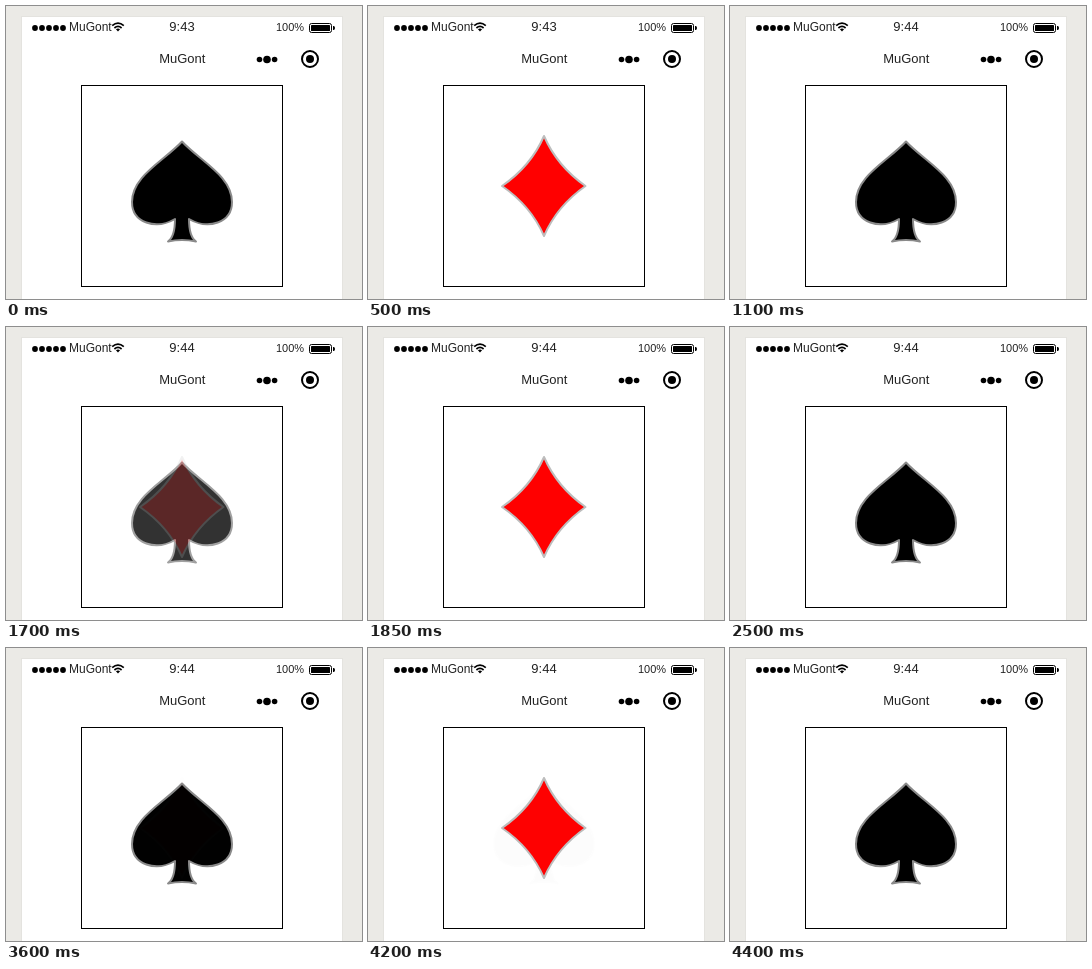
Write an HTML page that moves like this. It is 356 px wide and 293 px high and loops after 4950 ms.

```html
<!DOCTYPE html>
<html lang="en">
<head>
<meta charset="utf-8">
<title>Card suit</title>
<style>
  html, body { margin: 0; width: 100%; height: 100%; overflow: hidden; background: #ebeae6; }
  svg { display: block; width: 100%; height: 100%; }
  text { font-family: "Liberation Sans", Arial, sans-serif; fill: #222; }
</style>
</head>
<body>
<svg viewBox="0 0 356 293">
  <rect width="356" height="293" fill="#ebeae6"/>
  <rect x="15" y="10" width="322" height="290" fill="#e4e3df"/>
  <rect x="16" y="11" width="320" height="290" fill="#fff"/>

  <!-- status bar -->
  <g id="signal"></g>
  <text x="63" y="25" font-size="12">MuGont</text>
  <g fill="none" stroke="#000" stroke-width="1.7">
    <path d="M106.2 19.6Q112 14.6 117.8 19.6"/>
    <path d="M108.4 22Q112 18.9 115.6 22"/>
  </g>
  <path d="M109.9 23.3Q112 21.7 114.1 23.3L112 25.6Z"/>
  <text id="clock" x="176" y="25" font-size="13" text-anchor="middle">9:43</text>
  <text x="270" y="25" font-size="11">100%</text>
  <rect x="303.5" y="17.5" width="22" height="9" rx="2" fill="none" stroke="#000"/>
  <rect x="305" y="19" width="19" height="6" rx=".6"/>
  <path d="M327 20h.6q1.4 0 1.4 2t-1.4 2h-.6z"/>

  <!-- title bar -->
  <text x="176.3" y="57" font-size="13" text-anchor="middle">MuGont</text>
  <circle cx="253.5" cy="53.5" r="2.8"/>
  <circle cx="261" cy="53.5" r="3.8"/>
  <circle cx="268.6" cy="53.5" r="2.8"/>
  <circle cx="304" cy="53" r="8" fill="none" stroke="#000" stroke-width="2"/>
  <circle cx="304" cy="53" r="4"/>

  <rect x="75.5" y="79.5" width="201" height="201" fill="none" stroke="#000"/>
  <path id="spade" stroke="#8a8a8a" stroke-width="2" stroke-linejoin="round"
    d="M176 135.5C158 155 126 170 126 196C126 217 150 224 169 213C169 224 167 232 162 235.5Q176 232.5 190 235.5C185 232 183 224 183 213C202 224 226 217 226 196C226 170 194 155 176 135.5Z"/>
  <path id="diamond" fill="#f00" stroke="#bdbdbd" stroke-width="2" stroke-linejoin="round"
    d="M176 130Q189 160 217.5 180Q189 200 176 230Q163 200 134 180Q163 160 176 130Z"/>
</svg>
<script>
const LOOP = 4950, STEP = 50, FADE = 210;
const fadeEnds = [500, 1100, 1850, 2500, 3800, 4400];
const get = id => document.getElementById(id);
const spade = get("spade"), diamond = get("diamond"), clock = get("clock");

get("signal").innerHTML = Array.from({ length: 5 }, (_, i) =>
  `<circle cx="${29 + 7 * i}" cy="22" r="2.9"/>`).join("");

const ease = p => p * p * (3 - 2 * p);
const progress = (t, end) => ease(Math.min(1, Math.max(0, 1 - (end - t) / FADE)));

// Each fade swaps the suits: odd ones bring the diamond in, even ones take it out.
function diamondShare(t) {
  return fadeEnds.reduce((sum, end, i) => sum + (i % 2 ? -1 : 1) * progress(t, end), 0);
}

function draw(now) {
  const t = Math.floor((now % LOOP) / STEP) * STEP;
  const share = diamondShare(t);
  spade.setAttribute("opacity", 1 - share);
  diamond.setAttribute("opacity", share);
  clock.textContent = t < 800 ? "9:43" : "9:44";
}

const start = performance.now();
function tick() {
  draw(performance.now() - start);
  requestAnimationFrame(tick);
}
tick();
</script>
</body>
</html>
```
